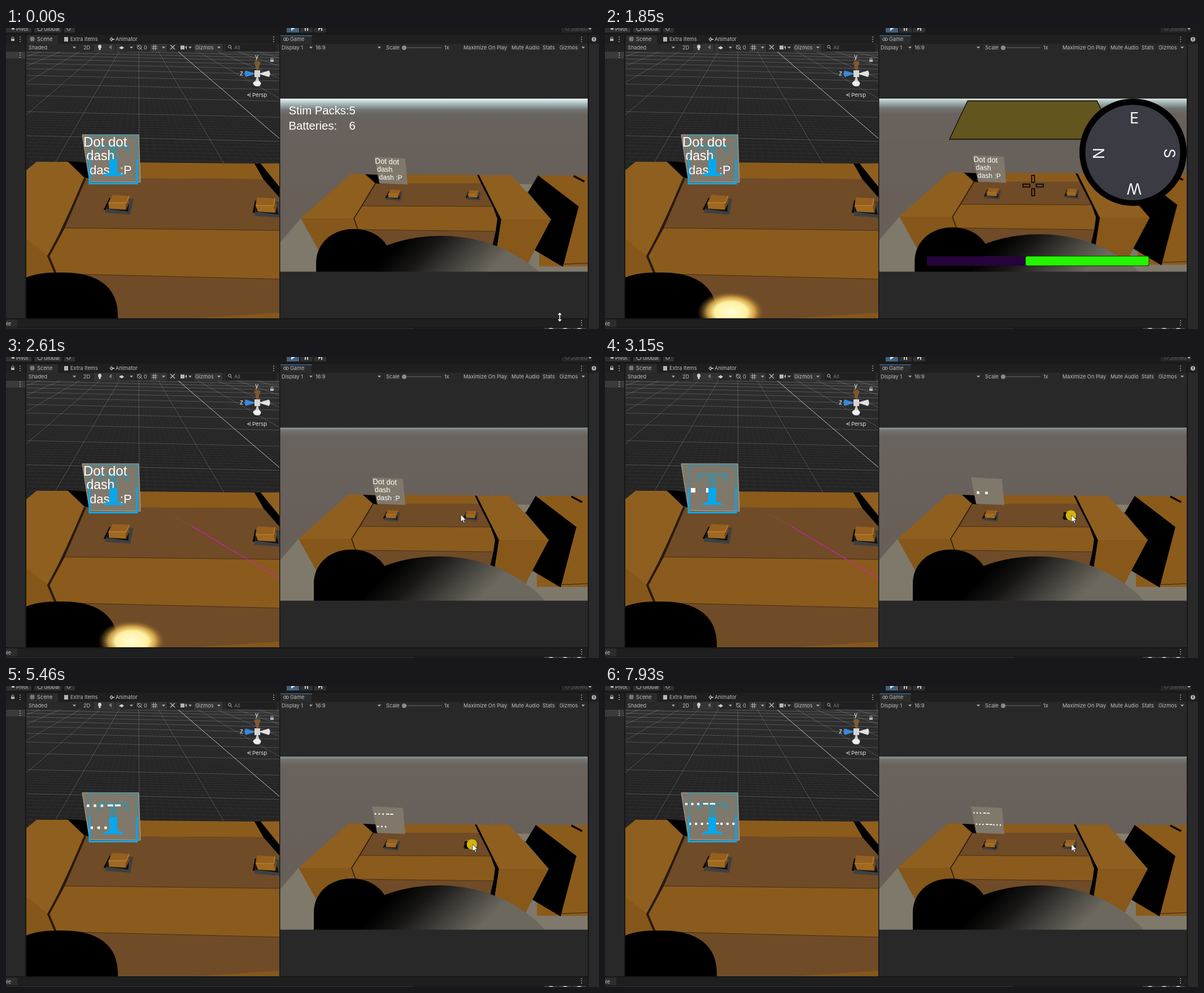
Write an HTML page with a canvas that moves like this. It is 1050 by 533 pixels and loops after 8000 ms.

```html
<!DOCTYPE html>
<html lang="en">
<head>
<meta charset="utf-8">
<title>Morse desk</title>
<style>
html, body { margin: 0; width: 100%; height: 100%; overflow: hidden; background: #191919; }
canvas { display: block; }
</style>
</head>
<body>
<canvas id="stage" width="1050" height="533"></canvas>
<script>
const W = 1050, H = 533, LOOP = 8000, STEP = 77;
const UI = 'Inter, sans-serif', SANS = '"Liberation Sans", Arial, sans-serif';
const OCHRE = '#8b5b1c', BROWN = '#6f4b27', BOARD = '#7f786b', GREY = '#b5b5b5', EDGE = '#171717';
let c = document.getElementById('stage').getContext('2d');

// Helpers; points are [x, y] pairs
function rect(x, y, w, h, fill) { c.fillStyle = fill; c.fillRect(x, y, w, h); }
function trace(pts) { c.beginPath(); pts.forEach(p => c.lineTo(...p)); }
function poly(fill, ...pts) { trace(pts); c.closePath(); c.fillStyle = fill; c.fill(); }
function line(color, width, ...pts) { trace(pts); c.strokeStyle = color; c.lineWidth = width; c.stroke(); }
function oval(x, y, rx, ry, fill) { c.beginPath(); c.ellipse(x, y, rx, ry, 0, 0, 7); c.fillStyle = fill; c.fill(); }
function ring(x, y, r, color = GREY) { c.beginPath(); c.arc(x, y, r, 0, 7); c.strokeStyle = color; c.lineWidth = 1; c.stroke(); }
function pill(x, y, w, h, fill) { c.beginPath(); c.roundRect(x, y, w, h, 3); c.fillStyle = fill; c.fill(); }
function text(s, x, y, size = 9.2, color = '#bdbdbd', font = UI) {
  c.font = size + 'px ' + font; c.fillStyle = color; c.fillText(s, x, y);
}
function stops(g, list) { list.forEach(([at, color]) => g.addColorStop(at, color)); return g; }
function fade(x0, y0, x1, y1, ...list) { return stops(c.createLinearGradient(x0, y0, x1, y1), list); }
function local(draw) { c.save(); draw(); c.restore(); }
function clipTo(x, y, w, h, draw) {
  local(() => { c.beginPath(); c.rect(x, y, w, h); c.clip(); draw(); });
}
function layer(draw) {
  const cv = document.createElement('canvas'), old = c;
  cv.width = W; cv.height = H;
  c = cv.getContext('2d'); draw(); c = old;
  return cv;
}
// Top half of a superellipse, extended downwards
function dome(x, y, rx, ry, power, fill) {
  const pts = [];
  for (let i = -40; i <= 40; i++) {
    const u = Math.sin(i / 40 * Math.PI / 2);
    pts.push([x + u * rx, y - ry * (1 - Math.abs(u) ** power) ** (1 / power)]);
  }
  poly(fill, ...pts, [x + rx, y + 60], [x - rx, y + 60]);
}

// Editor window
const caret = (x, y = 33) => poly('#a9a9a9', [x - 3, y], [x + 3, y], [x, y + 3.5]);
const menu = (x, y) => { for (let d = -4; d <= 4; d += 4) rect(x - .7, y + d - .7, 1.5, 1.5, '#c4c4c4'); };
const labels = (y, list) => { for (const s in list) text(s, list[s], y); };
function grid3(x, y, size) {
  for (let i = 1; i < 3; i++) {
    const d = i * size / 3;
    line(GREY, 1, [x, y + d], [x + size, y + d]); line(GREY, 1, [x + d, y], [x + d, y + size]);
  }
}
function drawTopBar() {
  rect(0, 0, W, 12, '#191919');
  for (const [x, w] of [[0, 45], [50, 48], [103, 19], [521, 22], [545, 22]]) rect(x, 0, w, 8, '#303030');
  rect(497, 0, 22, 8, '#46607c'); rect(984, 0, 54, 8, '#262626');
  labels(5, { Pivot: 18, Global: 67 }); text('Joined', 1000, 5, 9.2, '#5c5c5c');
  rect(10, 0, 5, 3, GREY); ring(60, 1, 4); ring(111, 1, 3); ring(994, 1, 3, '#555');
  poly('#cfe3f7', [505, 0], [512, 0], [505, 5]);
  rect(529, 0, 2, 5, '#ccc'); rect(533, 0, 2, 5, '#ccc');
  poly('#ccc', [553, 0], [558, 0], [553, 5]); rect(558, 0, 2, 5, '#ccc');
  caret(1034, 0);
}
function drawTabs() {
  rect(0, 12, W, 16, '#1f1f1f'); rect(0, 28, W, 14, '#292929');
  for (const x of [37, 486]) rect(x, 13, 55, 15, '#2c2c2c');
  rect(486, 13, 56, 1.5, '#356596');
  labels(23, { Scene: 55, 'Extra Items': 114, Animator: 194, Game: 503 });
  grid3(42, 15, 9); rect(103, 16, 7, 8, GREY);
  line(GREY, 1.2, [184, 20], [187, 17], [189, 20], [187, 23], [184, 20]); rect(187, 19, 5, 2, GREY);
  ring(494, 20, 2.4); ring(498, 20, 2.4);
  ring(12, 18, 2); rect(9, 19, 6, 4, GREY);
  for (const x of [25, 474, 1019]) menu(x, 20);
}
function drawTools() {
  for (const [x, w] of [[155, 47], [255, 30], [333, 50]]) rect(x, 28, w, 14, '#343434');
  rect(389, 29, 90, 12, '#202020');
  labels(38, {
    Shaded: 40, '2D': 137, '0': 244, Gizmos: 335, 'Display 1': 488, '16:9': 548, Scale: 673, '1x': 776,
    'Maximize On Play': 810, 'Mute Audio': 895, Stats: 950, 'Gizmos ': 980
  });
  text('All', 404, 38, 9.2, '#777');
  for (const x of [121, 222, 279, 326, 377, 540, 661, 1022]) caret(x);
  for (const x of [127, 154, 193, 229, 254, 286, 305, 332, 384, 545, 667, 806, 891, 946, 976]) rect(x, 28, 1, 14, '#1f1f1f');
  oval(166, 33, 3, 3.5, '#d0d0d0'); rect(164.5, 36, 3, 3, '#d0d0d0');
  poly('#777', [182, 34], [187, 30], [187, 38]);
  poly('#ccc', [200, 35], [205, 32], [209, 35], [205, 38]);
  ring(236, 34, 3.5); line(GREY, 1, [232, 30], [241, 39]);
  grid3(258, 29.5, 10);
  line(GREY, 1.5, [291, 30], [299, 38]); line(GREY, 1.5, [299, 30], [291, 38]);
  rect(309, 31, 7, 7, GREY); poly(GREY, [317, 34], [320, 31], [320, 38]);
  ring(396, 33, 2.5); line(GREY, 1, [398, 35], [400, 38]);
  rect(706, 34, 65, 1.5, '#555'); oval(705, 35, 4, 4, '#8b8b8b');
}
function drawFrame() {
  rect(0, 0, W, H, '#282828');
  drawTopBar(); drawTabs(); drawTools();
  rect(0, 28, 34, 14, '#222'); rect(0, 42, 34, 12, '#3a3a3a'); menu(25, 48);
  rect(34, 12, 2, 503, EDGE);
  rect(1030, 12, 2, 521, EDGE); rect(1032, 28, 18, 505, '#292929');
  oval(1041, 20, 4, 4, GREY); rect(1040.3, 17, 1.5, 5, '#333');
  rect(0, 514, 1030, 2, EDGE); rect(0, 516, 1030, 14, '#1f1f1f'); rect(0, 516, 20, 14, '#2c2c2c');
  text('ole', -4, 527); menu(1019, 522);
  rect(0, 530, 1030, 1, EDGE); rect(723, 531, 228, 2, '#1c1c1c');
  for (let x = 953; x < 1010; x += 25) { rect(x, 531, 23, 2, '#414141'); oval(x + 12, 533, 4, 2, GREY); }
}

// The console has the same faces in both views; only its corners differ
const SCENE_DESK = {
  outer: [54, 237], side: [-40, 314], backL: [110, 237], backR: [440, 240],
  tl: [140, 266], tr: [456, 268], br: [536, 359], bl: [102, 354],
  kneeL: [75, 404], kneeR: [560, 406], lowL: [88, 435], lowR: [540, 446], baseL: [100, 600], baseR: [540, 600],
  wall: [451, 240], wallEnd: [620, 238], wallKnee: [585, 406], tip: [760, 406], wallBase: [570, 600], foot: [700, 600],
  corner: [0, 600]
};
const GAME_DESK = {
  outer: [607, 243], side: [518, 322], backL: [632, 244], backR: [830, 245],
  tl: [650, 260], tr: [837, 260], br: [858, 301], bl: [626, 300],
  kneeL: [612, 322], kneeR: [866, 323], lowL: [619, 342], lowR: [863, 345], baseL: [640, 375], baseR: [856, 376],
  wall: [834, 246], wallEnd: [890, 245], wallKnee: [873, 324], tip: [961, 324], wallBase: [864, 382], foot: [917, 407],
  corner: [553, 385]
};
function drawDesk(d, seam) {
  poly('#8f5f1f', d.outer, d.backL, d.tl, d.kneeL, d.lowL, d.side);
  poly('#86571a', d.side, d.kneeL, d.lowL, d.baseL, d.corner);
  poly(OCHRE, d.backL, d.backR, d.tr, d.tl);
  poly(BROWN, d.tl, d.tr, d.br, d.bl);
  poly('#8a5b1c', d.bl, d.br, d.kneeR, d.lowR, d.lowL, d.kneeL);
  poly(BROWN, d.lowL, d.lowR, d.baseR, d.baseL);
  poly('#000', d.backR, d.wall, d.wallKnee, d.wallBase, d.baseR, d.lowR, d.kneeR, d.br, d.tr);
  poly('#8f5f1f', d.wall, d.wallEnd, d.tip, d.wallKnee);
  poly('#875819', d.wallKnee, d.tip, d.foot, d.wallBase);
  line('#4a3018', 1, d.lowL, d.lowR); line('#4a3018', 1, d.bl, d.br);
  line('#2a1a0b', seam, d.tl, d.bl, d.kneeL, d.lowL);
}
function drawKey(x, y, size, skew) {
  local(() => {
    c.transform(size, 0, skew, size, x, y);
    poly('#0a0704', [-9, -7], [2, -7], [2, 7], [-15, 5]);
    poly('#3c4042', [-8, -7], [15, -6], [12, 10], [-14, 8]);
    poly('#17120c', [-8, -6], [11, -6], [10, 7], [-12, 4]);
    poly('#955f1f', [-6, -10], [11, -9], [8, -2], [-10, -2]);
    poly('#9f6922', [-10, -2], [8, -2], [7.5, 5], [-9.5, 4]);
    poly('#754a17', [11, -9], [11, -2], [7.5, 5], [8, -2]);
    line('#b98233', .8, [-10, -2], [8, -2], [11, -9]);
  });
}

// Scene view
function drawGrid() {
  const vx = 235, vy = -18;
  const level = a => `rgba(200,200,200,${a})`;
  for (let k = -200; k < 200; k++) line(level(k % 10 ? .04 : .28), 1, [vx, vy], [536 + k * 15, 240]);
  for (let k = 0; k < 150; k++) {
    const y = vy + 855 / (3 + k / 10);
    line(level(k % 10 ? .07 - k / 2500 : .28), 1, [36, y - 5], [484, y + 5]);
  }
  line('rgba(225,225,225,.7)', 1, [vx, vy], [536, 240]);
}
function drawAxes() {
  const cones = ['#80592d', '#e2e2e2', '#c9c9c9', '#3589dc'];
  cones.forEach((fill, i) => local(() => {
    c.translate(445, 81); c.rotate(i * Math.PI / 2);
    poly(fill, [-5.5, -20], [5.5, -20], [1, -5], [-1, -5]);
    oval(0, -20, 5.5, 2.5, fill);
  }));
  oval(444.5, 98, 7, 4.5, '#eee');
  rect(440, 75, 10, 12, '#d6d6d6');
  text('y', 441, 55, 11, '#eee'); text('z', 414, 84, 11, '#eee');
  ring(471, 55, 2); rect(468, 56, 6, 4, GREY);
  line(GREY, 1, [434, 115], [427, 118.5], [434, 122]); line(GREY, 1, [427, 118.5], [434, 118.5]);
  text('Persp', 436, 122, 9.6, '#ddd');
}
function drawScene() {
  rect(36, 42, 448, 472, '#242424');
  drawGrid(); drawAxes();
  drawDesk(SCENE_DESK, 4);
  poly('#000', [109, 236], [147, 238], [150, 267], [139, 265]);
  poly('#85571c', [335, 514], [484, 504], [484, 514]);
  dome(95, 514, 103, 81, 2.5, '#000');
  drawKey(199, 313, 1.75, 0); drawKey(461, 318, 1.8, .55);
  const sign = [[135, 189], [235, 189], [238, 273], [148, 272]];
  poly(BOARD, ...sign); line('#b3aea4', 1, ...sign, sign[0]);
}
// Text gizmo: a frame with a serif T
function drawHandle(color) {
  c.strokeStyle = color; c.lineWidth = 3; c.strokeRect(148, 190.5, 84, 85);
  const half = [[0, 206], [27, 206], [28, 222], [25, 222], [19, 211], [7, 211], [7, 256], [17, 259], [17, 262], [0, 262]];
  const at = s => ([x, y]) => [190 + s * x, y];
  poly(color, ...half.map(at(1)), ...half.map(at(-1)).reverse());
}

// Text on the sign, in scene view coordinates
const CODE = '...--...--...';
function drawGreeting() {
  ['Dot dot', 'dash', 'dash :P'].forEach((s, i) => text(s, 137 + i * 5.5, 210 + i * 24.3, 24 - i, '#fff', SANS));
}
// The more symbols, the smaller they are set
function drawMorse(n) {
  const [size, gap, dash, x0, top, rows] = n < 3 ? [8, 27, 18, 152, 236, 0]
    : n < 6 ? [5.5, 17, 14, 146, 221, 0]
    : n < 11 ? [4.5, 12.3, 10, 143, 212, 39] : [4, 10.6, 9, 142, 209, 35];
  let x = x0, y = top;
  for (let i = 0; i < n; i++) {
    if (i === 5) { x = x0 + 6.5; y += rows; }
    const isDash = CODE[i] === '-';
    rect(x, y - size / 2, isDash ? dash : size, isDash ? size * .75 : size, '#fff');
    x += isDash ? dash + 3 : gap;
  }
}

// Game view, at its final camera pitch
function drawWorld() {
  rect(480, 90, 560, 360, fade(0, 100, 0, 300, [0, '#cfe6e6'], [.06, '#dce9e9'], [.09, '#b2c1c1'],
    [.125, '#8a9696'], [.15, '#737473'], [.2, '#69635d'], [1, '#685f59']));
  poly('#7f796b', [480, 366], [518, 322], [560, 380], [560, 450], [480, 450]);
  poly('#7f796b', [905, 450], [930, 374], [985, 406], [1040, 406], [1040, 450]);
  poly('#857d6e', [900, 261], [936, 262], [928, 276], [912, 274]);
  rect(940, 246, 100, 161, OCHRE);
  poly('#000', [938, 246], [1010, 301], [982, 408], [928, 376], [961, 324], [920, 276]);
  line('#38230e', 1, [984, 403], [1040, 401]);
  line('#000', 3.5, [1001, 247], [1020, 257]);
  drawDesk(GAME_DESK, 1.5);
  poly('#000', [632, 244], [656, 245], [658, 261], [650, 260]);
  drawKey(682.5, 281, 1, 0); drawKey(823, 281, .9, .1);
  poly(BOARD, [648, 213], [703, 216], [707, 262], [657, 260]);
  dome(612, 402, 67, 61, 2.1, '#000');
  dome(766, 553, 237, 200, 2, fade(715, 345, 815, 450, [0, '#000'], [.3, '#181716'], [.65, '#43413c'], [1, '#6c685e']));
}

// Overlays
function drawLight() {
  local(() => {
    c.translate(223, 503); c.scale(1, .62);
    oval(0, 0, 60, 60, stops(c.createRadialGradient(0, 0, 4, 0, 0, 60),
      [[0, '#fffbd0'], [.45, '#fff0a0'], [.68, 'rgba(225,175,75,.85)'], [1, 'rgba(110,74,38,0)']]));
  });
}
function drawLaser() {
  line('rgba(150,100,70,.4)', 1, [293, 279], [330, 300]);
  c.setLineDash([5, 1]); line('#e018c8', 1.3, [330, 300], [484, 392]); c.setLineDash([]);
}
function drawCrosshair() {
  c.strokeStyle = '#000'; c.lineWidth = 1.6;
  for (let i = 0; i < 4; i++) local(() => {
    c.translate(758, 279); c.rotate(i * Math.PI / 2); c.strokeRect(-2.5, 5.5, 5, 12.5);
  });
}
function drawCompass() {
  oval(935, 220, 95, 95, '#000'); oval(934.5, 220.5, 84, 84.5, '#3b3b44');
  c.textAlign = 'center';
  [...'ESWN'].forEach((s, i) => local(() => {
    c.translate(937, 222); c.rotate(i * Math.PI / 2);
    text(s, 0, -53, 27, '#f4f4f4');
  }));
  c.textAlign = 'left';
}
function drawPanel() {
  const board = [[642, 129], [871, 129], [905, 197], [610, 197]];
  poly('#62551d', ...board); line('#0c0a02', 1.3, ...board, board[0]);
  drawCompass();
  pill(570, 404, 180, 17, '#26043b'); pill(744, 403.5, 219.5, 18, '#0b3c06'); pill(745, 404.5, 217.5, 16, '#25f500');
}
function drawCounts() {
  text('Stim Packs:5', 500.5, 153, 20.3, '#fff', SANS);
  text('Batteries:', 500.5, 180, 20.3, '#fff', SANS);
  text('6', 607.5, 180, 20.3, '#fff', SANS);
}
function drawArrow(x, y) {
  const shape = [[0, 0], [0, 12.5], [3, 9.8], [5.2, 14.3], [7, 13.5], [5, 9.2], [9, 9.2]].map(p => [x + p[0], y + p[1]]);
  poly('#fff', ...shape); line('#222', .7, ...shape, shape[0]);
}
function drawResize(x, y) {
  line('#fff', 1.4, [x, y - 5], [x, y + 5]);
  for (const s of [-1, 1]) poly('#fff', [x - 3.5, y + 4 * s], [x, y + 8 * s], [x + 3.5, y + 4 * s]);
}

// Key presses: an even rhythm with a rest after each pair of dashes.
// A dot shows when pressed, a dash when released.
const HOLD = 150;
let clock = 2840;
const presses = [...CODE].map((sign, i) => {
  const at = clock;
  clock += sign === '.' ? 310 : 390;
  if (sign === '-' && CODE[i + 1] === '.') clock += 290;
  return { at, shown: sign === '.' ? at : at + HOLD };
});
function ramp(t, from, to) { return Math.min(1, Math.max(0, (t - from) / (to - from))); }

const frame = layer(drawFrame), scene = layer(drawScene), world = layer(drawWorld);

function draw(now) {
  const t = Math.floor((now % LOOP + 8) / STEP) * STEP + 4;
  const typed = presses.filter(p => t >= p.shown).length;
  const pressed = presses.some(p => t >= p.at && t < p.at + HOLD);
  const lift = 15 * (1 - ramp(t, 1790, 2600)) ** 2.7;
  const sign = () => typed ? drawMorse(typed) : drawGreeting();

  c.drawImage(frame, 0, 0);
  clipTo(36, 42, 448, 472, () => {
    c.drawImage(scene, 0, 0);
    drawHandle('rgba(35,150,185,.48)');
    sign();
    clipTo(140, 232, 100, 50, () => drawHandle('#05a8ee'));
    if (t >= 450 && t < 2690) drawLight();
    if (t >= 1930 && t < 3300) drawLaser();
  });
  rect(484, 12, 1.5, 503, EDGE);

  clipTo(485.5, 125, 544.5, 306.5, () => {
    local(() => {
      c.translate(lift * .27, lift);
      c.drawImage(world, 0, 0);
      // Scene sign to game sign
      c.translate(648, 213); c.transform(.55, .02, .022, .57, 0, 0); c.translate(-135, -189);
      sign();
    });
    if (pressed) { rect(812, 275, 10, 13, '#0a0704'); oval(825, 280.5, 9.3, 9.3, '#d3b20c'); }
    if (t < 1300) drawCounts();
    else if (t < 1930) drawPanel();
    if (t >= 450 && t < 1930) drawCrosshair();
  });

  const move = ramp(t, 2300, 2760);
  if (t < 70) drawResize(980.5, 512);
  else if (t < 140) drawArrow(768, 339);
  else if (t >= 1930) drawArrow(757 + 69 * move, 277.5 + 2.5 * move);
}

const start = performance.now();
function tick() {
  draw(performance.now() - start);
  requestAnimationFrame(tick);
}
tick();
</script>
</body>
</html>
```
